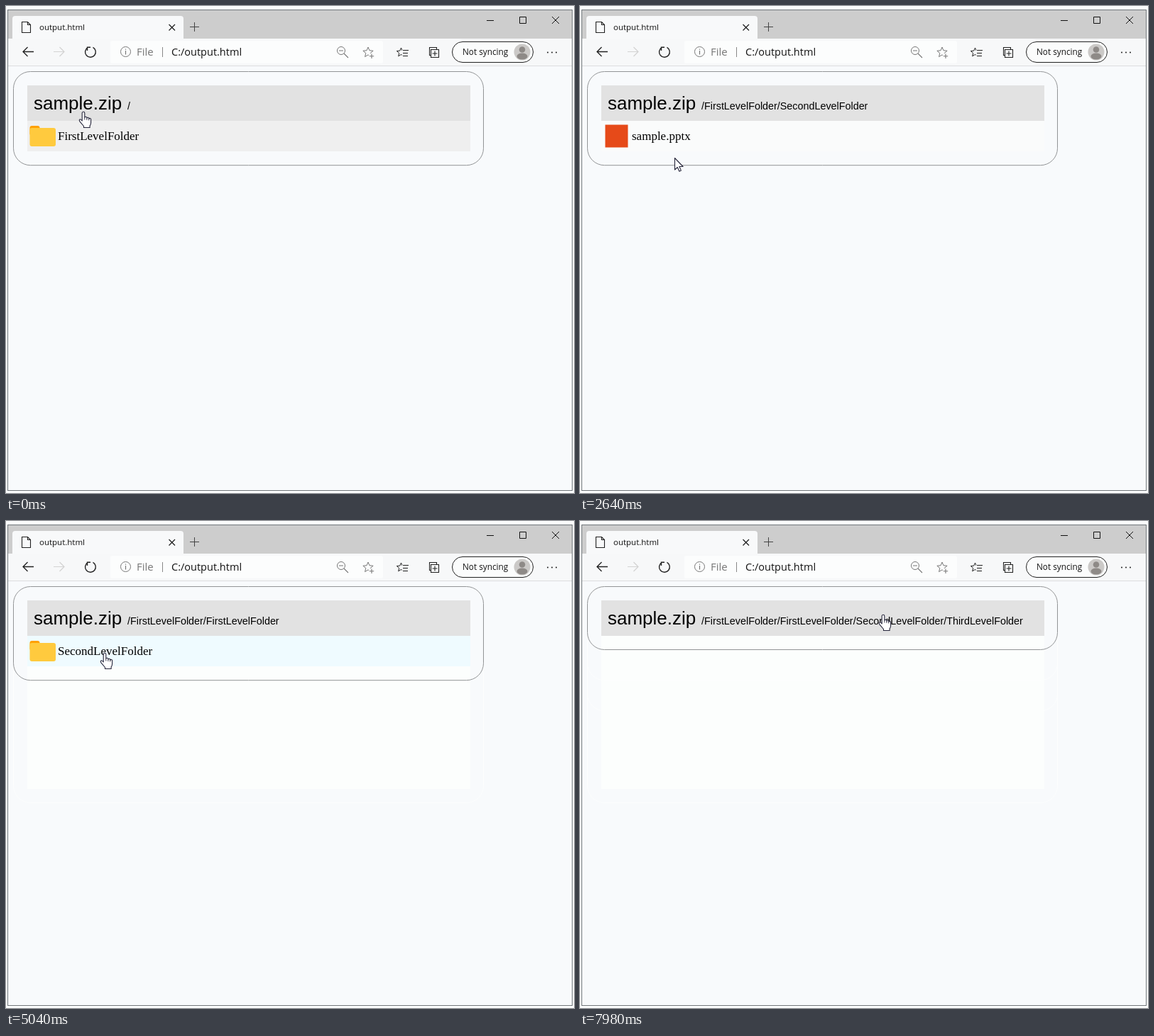
An HTML page with a canvas for the animation above (8000 ms loop, 800 by 687 pixels).

```html
<!DOCTYPE html>
<html lang="en">
<head>
<meta charset="utf-8">
<title>output.html</title>
<style>
html, body { margin: 0; width: 100%; height: 100%; overflow: hidden; background: #fcfdfd; }
canvas { display: block; }
</style>
</head>
<body>
<canvas id="stage" width="800" height="687"></canvas>
<script>
const ctx = document.getElementById('stage').getContext('2d');
const LOOP = 8000, STEP = 60;
const ROW_TOP = 162, ROW_H = 43.2;
const UI = '"Open Sans", "Noto Sans", sans-serif';
const SANS = '"Liberation Sans", Arial, sans-serif';
const SERIF = '"Liberation Serif", "Times New Roman", serif';
const PAGE = '#f8fafc', GRAY = '#efefef', PALE = '#fafbfb', HOVER = '#effbff';

const first = '/FirstLevelFolder', second = '/SecondLevelFolder', third = '/ThirdLevelFolder';
const outer = {
  path: first, hover: true, lead: PALE,
  rows: [['folder', 'FirstLevelFolder'], ['folder', 'SecondLevelFolder'],
    ['zip', 'SecondLevelFolder1.zip'], ['sheet', 'sample.xlsx'], ['doc', 'word.doc']]
};

// residue: row counts of earlier panels that remain faintly visible
const views = [
  { at: 0, path: '/', lead: GRAY, rows: [['folder', 'FirstLevelFolder']] },
  { at: 1320, ...outer },
  { at: 2640, path: first + second, lead: PALE, rows: [['slides', 'sample.pptx']] },
  { at: 3840, ...outer },
  { at: 5040, path: first + first, hover: true, residue: [5], rows: [['folder', 'SecondLevelFolder']] },
  { at: 5820, path: first + first + second, hover: true, residue: [5, 1],
    rows: [['folder', 'ThirdLevelFolder'], ['zip', 'ThirdLevelFolder1.zip']] },
  { at: 7140, path: first + first + second + third, residue: [5, 1, 2], rows: [] }
];

// time, x, y, pointer shape from this time on
const moves = [
  [0, 106.5, 149, 'hand'], [360, 122.5, 186, 'hand'],
  [2160, 122.5, 186, 'hand'], [2520, 133, 214, 'hand'],
  [2640, 133, 214, 'arrow'], [3060, 133, 214, 'arrow'],
  [3600, 200, 146, 'hand'], [3660, 207, 139, 'hand'],
  [3840, 207, 139, 'hand'], [4080, 195, 152, 'arrow'],
  [4260, 171, 167, 'hand'], [4500, 136.5, 186, 'hand'],
  [7200, 136.5, 186, 'arrow'], [7500, 136.5, 186, 'arrow'],
  [7620, 196, 156, 'arrow'], [7860, 345, 148, 'arrow'],
  [7980, 424.5, 132, 'hand']
];

const pointers = {
  arrow: new Path2D('M0 0V16.5L3.8 13L6.4 18.7L8.9 17.6L6.4 12H11.6Z'),
  hand: new Path2D('M-.3 12.5V1.6a1.8 1.8 0 0 1 3.6 0V7.6a1.7 1.7 0 0 1 3.1 .3V8.6' +
    'a1.6 1.6 0 0 1 2.9 .3V9.7a1.5 1.5 0 0 1 2.8 .5V15Q12 18 10.6 19.5V22H2V20' +
    'L-3.6 13.4Q-5 10.9 -3.2 10.2Q-2 10 -.3 12.5Z')
};

function box(x, y, w, h, color) {
  ctx.fillStyle = color;
  ctx.fillRect(x, y, w, h);
}

function rounded(x, y, w, h, r, fill, stroke) {
  ctx.beginPath();
  ctx.roundRect(x, y, w, h, r);
  if (fill) { ctx.fillStyle = fill; ctx.fill(); }
  if (stroke) { ctx.strokeStyle = stroke; ctx.lineWidth = 1; ctx.stroke(); }
}

function line(d, color = '#222', width = 1) {
  ctx.strokeStyle = color;
  ctx.lineWidth = width;
  ctx.stroke(new Path2D(d));
}

function ring(x, y, r, color) {
  ctx.beginPath();
  ctx.arc(x, y, r, 0, 7);
  ctx.strokeStyle = color;
  ctx.lineWidth = 1;
  ctx.stroke();
}

function disc(x, y, r, color) {
  ctx.beginPath();
  ctx.arc(x, y, r, 0, 7);
  ctx.fillStyle = color;
  ctx.fill();
}

function label(str, x, y, size, family, color = '#000') {
  ctx.font = `${size}px ${family}`;
  ctx.fillStyle = color;
  ctx.fillText(str, x, y);
}

function star(x, y, r, color) {
  ctx.beginPath();
  for (let i = 0; i < 10; i++) {
    const a = i * Math.PI / 5 - Math.PI / 2, k = i % 2 ? r * .45 : r;
    ctx.lineTo(x + k * Math.cos(a), y + k * Math.sin(a));
  }
  ctx.closePath();
  ctx.strokeStyle = color;
  ctx.lineWidth = 1;
  ctx.stroke();
}

function drawTabs() {
  box(3, 6, 794, 40, '#cdcdcd');
  rounded(9, 14, 241, 33, [4, 4, 0, 0], '#f8f9fa');
  line('M22.5 22.5H30.5L34.5 26.5V37.5H22.5ZM30.5 22.5V26.5H34.5', '#222', 1.1);
  label('output.html', 47, 34, 11.5, UI, '#111');
  line('M229.5 26L238 34.5M238 26L229.5 34.5', '#222', 1.3);
  line('M259 29.5H272M265.5 23V36', '#444');
  line('M677 20.5H687M723.5 15.5H732.5V24.5H723.5ZM769 15L779 25M779 15L769 25', '#111');
}

function drawToolbar() {
  box(3, 46, 794, 38, '#f7f8f9');
  box(3, 84, 794, 1, '#dcdddf');
  rounded(147, 49, 384, 32, 3, '#fcfdfd');
  line('M39 64.5H24M30.5 58L24 64.5L30.5 71', '#222', 1.3);
  line('M67 64.5H82M75.5 58L82 64.5L75.5 71', '#d3d3d3', 1.2);
  line('M115 58.6A7.4 7.4 0 1 0 122.5 58.4M114.5 63V58.2H119', '#222', 1.4);
  ring(168.5, 64.5, 7, '#777');
  line('M168.5 63V68.5M168.5 60.5V61.8', '#777', 1.2);
  label('File', 184, 70, 15, UI, '#777');
  box(220, 58, 1, 14, '#888');
  label('C:/output.html', 233, 70, 14.5, UI, '#111');
  ring(472, 63, 5.5, '#777');
  line('M469 63H475M476 67L482 73', '#777', 1.1);
  star(510, 65.5, 7.5, '#777');
  box(511, 67, 8, 8, '#fcfdfd');
  line('M515 67.5V74M511.8 70.7H518.2', '#777', 1.1);
  star(556.5, 65.5, 6.5, '#222');
  box(558, 61, 9, 12, '#f7f8f9');
  line('M559 62.5H567M559 66.5H566M559 70.5H566', '#222', 1.2);
  line('M598.5 61.5H609.5V72.5H598.5ZM598.5 69.5H596.5V58.5H606.5V61.5M604 63.5V70.5M600.5 67H607.5', '#222', 1.1);
  rounded(628.5, 50.5, 114, 29, 14.5, '#fbfcfc', '#222');
  label('Not syncing', 643, 69, 11.75, UI, '#111');
  drawAvatar(727, 65);
  for (const x of [763, 769, 775]) disc(x, 65.5, 1, '#222');
}

function drawAvatar(x, y) {
  disc(x, y, 11.5, '#cbc9c7');
  disc(x, y - 3.5, 4.3, '#8e8a87');
  ctx.beginPath();
  ctx.ellipse(x, y + 6, 7.5, 4.6, 0, 0, 7);
  ctx.fill();
}

function drawFolder(y) {
  rounded(33.5, y + 7, 14, 14, 3, '#ffa000');
  rounded(33.5, y + 10, 36.5, 26, 3, '#ffca3e');
}

function drawZip(y) {
  box(36, y + 1.6, 31, 40, '#c8a44c');
  box(37.5, y + 3, 28, 37, '#ffe9a0');
  for (let i = 0; i < 9; i++) box(i % 2 ? 51 : 48, y + 3 + i * 2, 4, 1.2, '#7d6a35');
  rounded(48, y + 21, 7, 13, 3, '#f4d778', '#8d7638');
  ring(51.5, y + 30, 1.8, '#6d5a2b');
}

const icons = {
  folder: drawFolder,
  zip: drawZip,
  sheet: y => box(32, y + 2, 39, 39, '#b3dbbf'),
  doc: y => box(35, y + 6.2, 32, 32, '#1149a6'),
  slides: y => box(35.5, y + 5.5, 32, 32, '#e64a19')
};

const outline = (n, color) =>
  rounded(10.5, 92.5, 662, 89 + n * ROW_H, 24, null, color);

function drawPanel(view, pointer) {
  if (view.residue) {
    box(30, ROW_TOP, 624, 5 * ROW_H, '#fcfefd');
    for (const n of view.residue) outline(n, '#fdfefe');
  }
  outline(view.rows.length, '#929496');
  box(30, 112, 624, 50, '#e2e2e2');
  label('sample.zip', 39, 146, 26, SANS);
  label(view.path, 171, 146, 14.35, SANS);

  const over = view.hover ? Math.floor((pointer.y - ROW_TOP) / ROW_H) : -1;
  view.rows.forEach(([icon, name], i) => {
    const y = ROW_TOP + i * ROW_H, top = Math.round(y);
    const color = i === over ? HOVER : i ? GRAY : view.lead;
    box(30, top, 624, Math.round(y + ROW_H) - top, color);
    icons[icon](y);
    label(name, 73, Math.round(y + 27), 17, SERIF);
  });
}

function pointerAt(t) {
  const i = moves.findLastIndex(m => m[0] <= t);
  const [t0, x0, y0, shape] = moves[i];
  const [t1, x1, y1] = moves[i + 1] || [LOOP, x0, y0];
  const k = (t - t0) / (t1 - t0);
  return { x: x0 + (x1 - x0) * k, y: y0 + (y1 - y0) * k, shape };
}

function drawPointer({ x, y, shape }) {
  ctx.save();
  ctx.translate(Math.round(x) + .5, Math.round(y) + .5);
  ctx.fillStyle = '#fff';
  ctx.strokeStyle = '#25253a';
  ctx.lineWidth = 1.1;
  ctx.lineJoin = 'round';
  ctx.fill(pointers[shape]);
  ctx.stroke(pointers[shape]);
  if (shape === 'hand') line('M3.3 7.5V11M6.4 8.5V11.5M9.3 9.5V12', '#25253a', .9);
  ctx.restore();
}

function render(time) {
  const t = Math.floor(time % LOOP / STEP) * STEP;
  const pointer = pointerAt(t);
  box(0, 0, 800, 687, '#fcfdfd');
  box(2, 5, 796, 679, '#70767a');
  box(3, 6, 794, 677, PAGE);
  drawTabs();
  drawToolbar();
  drawPanel(views.findLast(v => v.at <= t), pointer);
  drawPointer(pointer);
}

const start = performance.now();
function tick() {
  render(performance.now() - start);
  requestAnimationFrame(tick);
}
tick();
</script>
</body>
</html>
```
